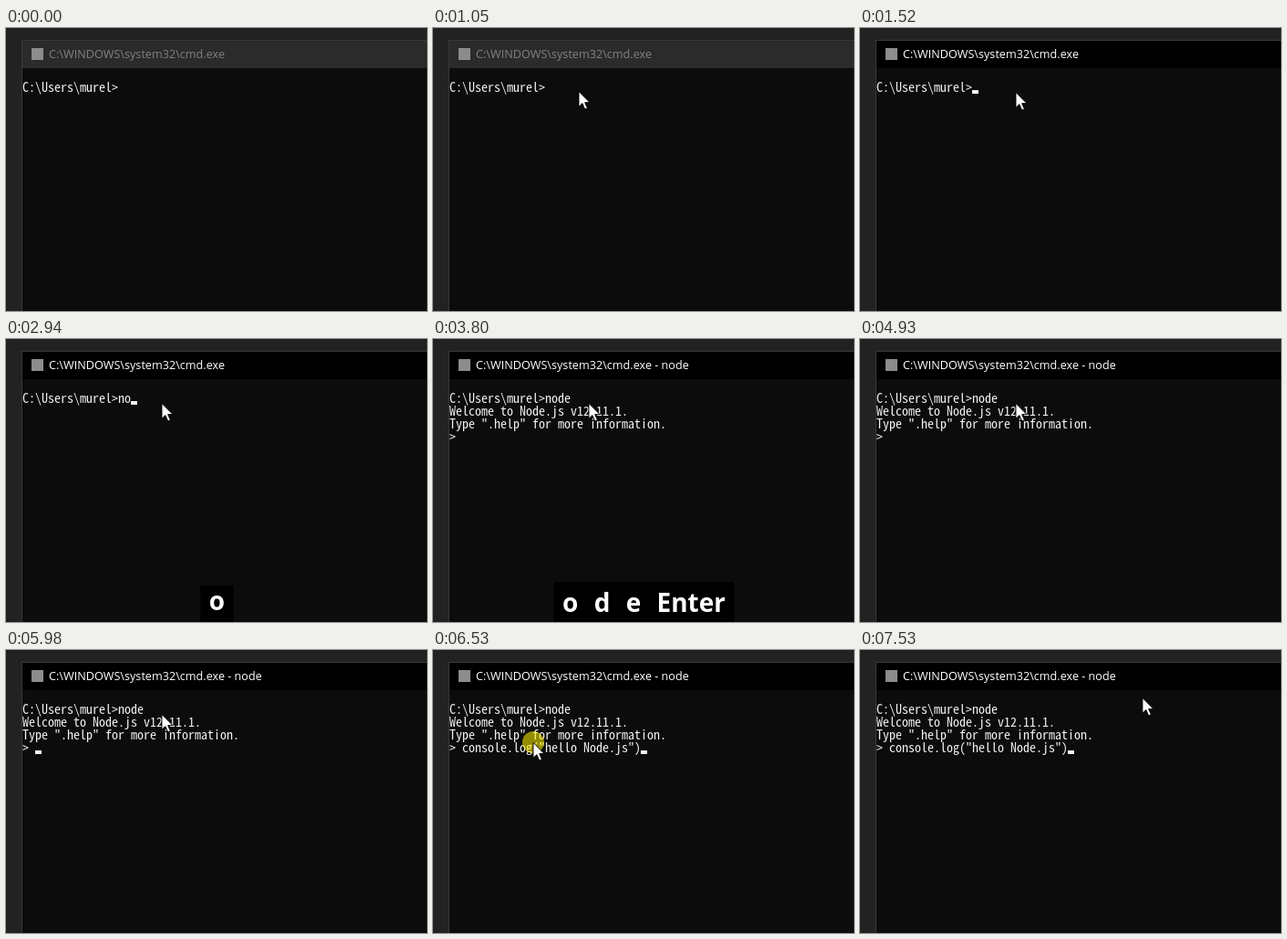
Write an HTML page that moves like this. It is 462 px wide and 310 px high and loops after 8000 ms.

```html
<!DOCTYPE html>
<html lang="en">
<head>
<meta charset="utf-8">
<title>Node.js prompt</title>
<style>
  html, body { margin: 0; width: 100%; height: 100%; overflow: hidden; background: #222; }
  svg { display: block; width: 462px; height: 310px; }
  text { white-space: pre; }
  #title { font: 12.65px "Open Sans", "Noto Sans", sans-serif; }
  #rows { font: 14px "Noto Sans Mono CJK SC", "Noto Sans Mono CJK JP", "Liberation Mono", monospace; fill: #f2f2f2; }
  #keys { font: 700 28px "Open Sans", "Noto Sans", sans-serif; word-spacing: 10px; fill: #fff; text-anchor: middle; }
</style>
</head>
<body>
<svg viewBox="0 0 462 310">
  <rect width="462" height="310" fill="#222"/>
  <rect x="17" y="13" width="445" height="297" fill="#393939"/>
  <rect id="bar" x="18" y="14" width="444" height="30"/>
  <rect x="18" y="44" width="444" height="266" fill="#0c0c0c"/>
  <rect x="28" y="22" width="13" height="13" fill="#8c8c8c"/>
  <text id="title" x="47" y="33"></text>
  <g id="rows">
    <text x="18" y="70"></text>
    <text x="18" y="84"></text>
    <text x="18" y="98"></text>
    <text x="18" y="112"></text>
  </g>
  <rect id="caret" width="7" height="4" fill="#f2f2f2"/>
  <rect id="plate" height="50"/>
  <text id="keys" x="231.5"></text>
  <g id="mouse">
    <circle id="click" r="12" fill="#fff000" fill-opacity=".56"/>
    <path d="M0 .5V17.3L3.9 13.6L6.7 20L9.4 18.8L6.7 12.6H12Z" fill="#fff" stroke="#000" stroke-width=".9"/>
  </g>
</svg>
<script>
const LOOP = 8000, CELL = 7, LINE = 14;
const STEP = 74;    // the pointer moves in jumps of this many ms
const BLINK = 550;  // caret half period
const HOLD = 950;   // how long a pressed key stays on show

const ENTER = 3650, BANNER = 3800, READY = 4360, PASTE = 6530;
const clicks = [1130, 6450];
const strokes = [
  { key: 'n', at: 2700, hold: 240 },
  { key: 'o', at: 2940 },
  { key: 'd', at: 3210 },
  { key: 'e', at: 3330 },
  { key: 'Enter', at: ENTER }
];
const wakes = [clicks[0], ...strokes.map(s => s.at), READY, PASTE, 6990];
const glides = [
  { at: 70, steps: 6, x: 181, y: 88 },
  { at: 590, steps: 2, x: 173, y: 76 },
  { at: 900, steps: 3, x: 160, y: 69 },
  { at: 1370, steps: 3, x: 171, y: 70 },
  { at: 6150, steps: 5, x: 110, y: 101 },
  { at: 6760, steps: 6, x: 310, y: 52 }
];

const $ = id => document.getElementById(id);
const rows = [...$('rows').children];
const prompt = 'C:\\Users\\murel>';
const show = (el, on) => el.setAttribute('visibility', on ? 'visible' : 'hidden');
const set = (el, attrs) => { for (const k in attrs) el.setAttribute(k, attrs[k]); };
const write = (el, s) => { if (el.textContent !== s) el.textContent = s; };
const smooth = p => p * p * (3 - 2 * p);

function pointer(t) {
  let x = 364, y = 302;
  for (const g of glides) {
    if (t < g.at) break;
    const p = smooth(Math.min(1, (Math.floor((t - g.at) / STEP) + 1) / g.steps));
    x += (g.x - x) * p;
    y += (g.y - y) * p;
  }
  return [x, y];
}

function screen(t) {
  const typed = strokes.filter(s => s.at <= t && s.at < ENTER).map(s => s.key).join('');
  const lines = [prompt + typed];
  if (t >= BANNER) {
    lines.push('Welcome to Node.js v12.11.1.', 'Type ".help" for more information.',
      t < PASTE ? '> ' : '> console.log("hello Node.js")');
  }
  return lines;
}

function drawCaret(t, lines) {
  const wake = wakes.findLast(w => w <= t);
  const busy = t >= ENTER && t < READY;
  show($('caret'), !busy && Math.floor((t - wake) / BLINK) % 2 === 0);
  const row = lines.length - 1;
  set($('caret'), { x: 18 + lines[row].length * CELL, y: 68 + row * LINE });
}

function drawKeys(t) {
  const held = strokes.filter(s => t >= s.at && t < s.at + (s.hold || HOLD));
  const label = held.map(s => s.key).join(' ');
  const tall = /[dE]/.test(label);
  write($('keys'), label);
  show($('plate'), label);
  if (!label) return;
  const w = $('keys').getComputedTextLength() + 19;
  set($('keys'), { y: tall ? 299 : 297 });
  set($('plate'), { x: 231.5 - w / 2, y: tall ? 266 : 270, width: w });
}

function draw(t) {
  const active = t >= clicks[0], lines = screen(t);
  set($('bar'), { fill: active ? '#000' : '#2b2b2b' });
  set($('title'), { fill: active ? '#fff' : '#808080' });
  write($('title'), 'C:\\WINDOWS\\system32\\cmd.exe' + (t >= ENTER + STEP ? ' - node' : ''));
  rows.forEach((el, i) => write(el, lines[i] || ''));
  drawCaret(t, lines);
  drawKeys(t);

  const [x, y] = pointer(t);
  set($('mouse'), { transform: `translate(${x} ${y})` });
  const inside = t >= glides[0].at;
  show($('mouse'), inside);
  show($('click'), inside && clicks.some(c => t >= c && t < c + 2 * STEP));
}

// Scale the console font so that one character fills one cell.
rows[0].textContent = prompt;
const advance = rows[0].getComputedTextLength() / prompt.length;
$('rows').style.fontSize = 14 * CELL / advance + 'px';

const start = performance.now();
(function tick() {
  draw((performance.now() - start) % LOOP);
  requestAnimationFrame(tick);
})();
</script>
</body>
</html>
```
